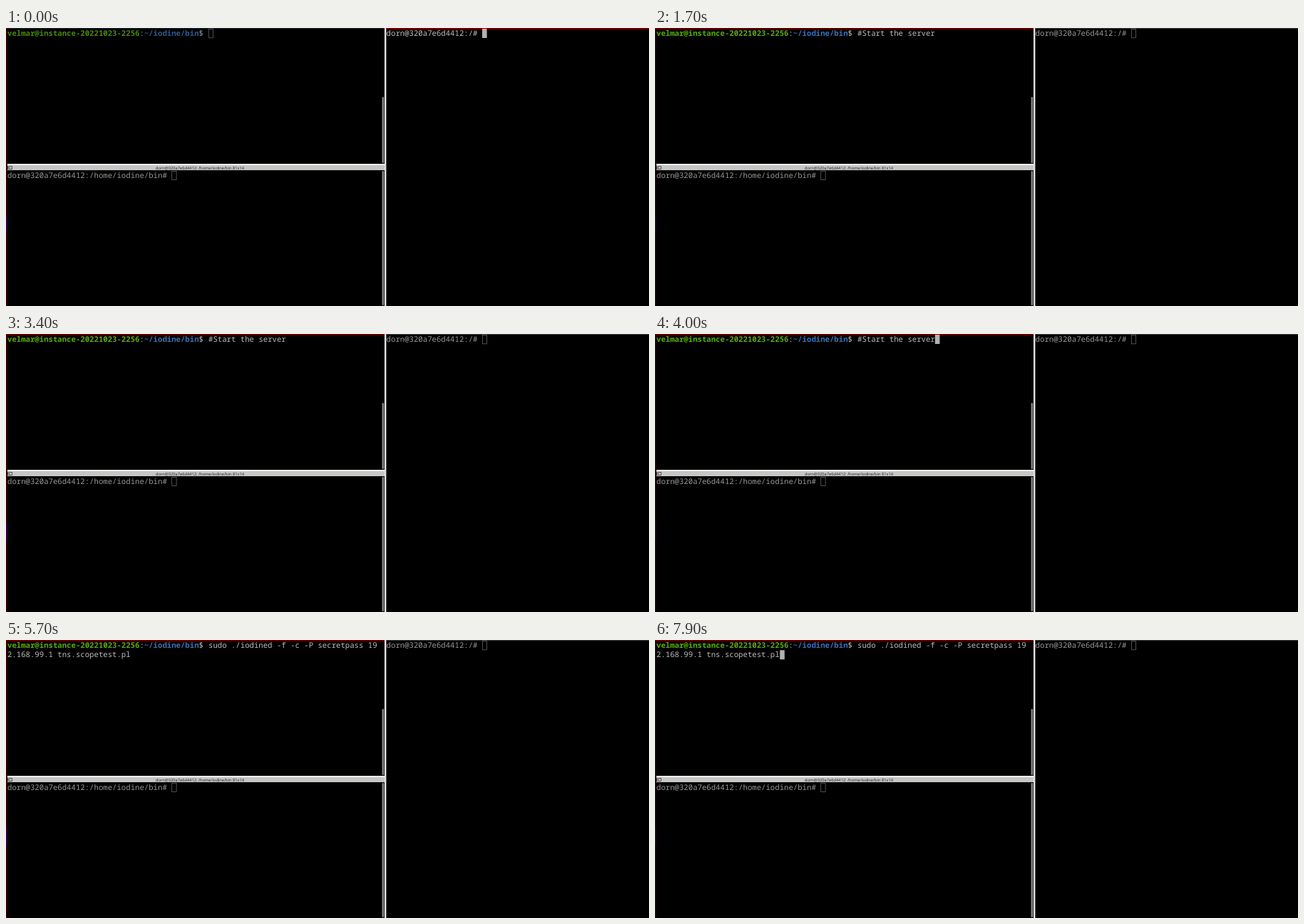
An HTML page that plays this animation: 902x391 px, repeating every 8 s.

```html
<!DOCTYPE html>
<html lang="en">
<head>
<meta charset="utf-8">
<title>Terminal session</title>
<style>
  html, body { margin: 0; width: 100%; height: 100%; overflow: hidden; background: #000; }
  svg { display: block; width: 100%; height: 100%; }
  text {
    font: 10.667px "Noto Sans Mono", "DejaVu Sans Mono", monospace;
    fill: #bdbdbd;
    white-space: pre;
    text-rendering: geometricPrecision;
  }
  .title { font: 5.7px "Open Sans", "Noto Sans", sans-serif; fill: #222; }
  .user { font-weight: bold; fill: #57ad0b; }
  .path { font-weight: bold; fill: #3b72b6; }
  .hollow { fill: none; stroke: #626262; stroke-width: .8; }
  .solid { fill: #b2b2b2; }
  .dim { opacity: .8; }
  .bar { fill: #888; }

  /* Every change is a hard cut; 1% of the loop is 80 ms. */
  .server, .server *, .client, .client *, .typed { animation: 8s step-end infinite; }
  .server .pane { animation-name: server-pane; }
  .client .pane { animation-name: client-pane; }
  .server .idle { animation-name: server-idle; }
  .client .idle { animation-name: client-idle; }
  .server .edge { animation-name: server-edge; }
  .client .edge { animation-name: client-edge; }
  .server .solid { animation-name: server-cursor; }
  .client .solid { animation-name: client-cursor; }
  .server .word1 { animation-name: word1; }
  .server .word2 { animation-name: word2; }
  .server .word3 { animation-name: word3; }
  .server .command { animation-name: command; }

  @keyframes server-pane { 0% { opacity: .8 } 11.25%, 100% { opacity: 1 } }
  @keyframes client-pane { 0% { opacity: 1 } 11.25%, 100% { opacity: .8 } }
  @keyframes server-idle { 0% { opacity: 1 } 11.25%, 100% { opacity: 0 } }
  @keyframes client-idle { 0% { opacity: 0 } 11.25%, 100% { opacity: 1 } }
  @keyframes server-edge { 0% { fill: #24242e } 11.25%, 100% { fill: #850000 } }
  @keyframes client-edge { 0% { fill: #a00000 } 11.25%, 100% { fill: #3c3c40 } }
  @keyframes client-cursor { 0% { opacity: 1 } 6.25%, 100% { opacity: 0 } }

  @keyframes word1 { 0% { opacity: 0 } 21.25% { opacity: 1 } 63.75%, 100% { opacity: 0 } }
  @keyframes word2 { 0% { opacity: 0 } 21.25% { opacity: 1 } 62.5%, 100% { opacity: 0 } }
  @keyframes word3 { 0% { opacity: 0 } 21.25% { opacity: 1 } 61.25%, 100% { opacity: 0 } }
  @keyframes command { 0% { opacity: 0 } 71.25%, 100% { opacity: 1 } }

  @keyframes server-cursor {
    0%     { opacity: 0; transform: translate(0, 0) }
    11.25% { opacity: 1; transform: translate(0, 0) }
    20%    { opacity: 0; transform: translate(108.8px, 0) }
    23.75% { opacity: 1; transform: translate(108.8px, 0) }
    27.5%  { opacity: 0; transform: translate(108.8px, 0) }
    36.25% { opacity: 1; transform: translate(108.8px, 0) }
    42.5%  { opacity: 0; transform: translate(108.8px, 0) }
    48.75% { opacity: 1; transform: translate(108.8px, 0) }
    58.75% { opacity: 0; transform: translate(108.8px, 0) }
    61.25% { opacity: 1; transform: translate(70.4px, 0) }
    62.5%  { opacity: 1; transform: translate(44.8px, 0) }
    63.75% { opacity: 1; transform: translate(0, 0) }
    71.25% { opacity: 0; transform: translate(-108.8px, 13.3px) }
    73.75% { opacity: 1; transform: translate(-108.8px, 13.3px) }
    77.5%  { opacity: 0; transform: translate(-108.8px, 13.3px) }
    85%    { opacity: 1; transform: translate(-108.8px, 13.3px) }
    92.5%  { opacity: 0; transform: translate(-108.8px, 13.3px) }
    98.75%, 100% { opacity: 1; transform: translate(-108.8px, 13.3px) }
  }
</style>
</head>
<body>
<svg viewBox="0 0 902 391" preserveAspectRatio="none">
  <rect width="902" height="391"/>
  <rect width="1.6" height="391" fill="#380006"/>
  <rect y="264" width="1.6" height="24" fill="#2c0048"/>

  <g class="server">
    <rect class="edge" width="531" height="1"/>
    <g class="pane">
      <text x="2" y="11"><tspan class="user">velmar@instance-20221023-2256</tspan>:<tspan class="path">~/iodine/bin</tspan>$</text>
    </g>
    <rect class="hollow idle" x="284.4" y="1.4" width="6" height="12.4"/>
    <text class="word1" x="284" y="11">#Start</text>
    <text class="word2" x="328.8" y="11">the</text>
    <text class="word3" x="354.4" y="11">server</text>
    <g class="command">
      <text x="284" y="11">sudo ./iodined -f -c -P secretpass 19</text>
      <text x="2" y="24.3">2.168.99.1 tns.scopetest.pl</text>
    </g>
    <rect class="solid" x="284" y="1" width="6.6" height="13"/>
    <rect class="bar" x="527.6" y="97" width="2.6" height="93" rx="1.2"/>
  </g>

  <g>
    <text class="dim" x="2" y="211">dorn@320a7e6d4412:/home/iodine/bin#</text>
    <rect class="hollow" x="232.7" y="201.4" width="6.4" height="12.2"/>
    <rect class="bar" x="527.6" y="201" width="2.6" height="189" rx="1.2"/>
  </g>

  <g class="client">
    <rect class="edge" x="534" width="368" height="1"/>
    <g class="pane">
      <text x="533.6" y="11">dorn@320a7e6d4412:/#</text>
    </g>
    <rect class="hollow idle" x="668.4" y="1.4" width="6" height="12.4"/>
    <rect class="solid" x="668" y="1" width="6.6" height="13"/>
  </g>

  <rect x="2" y="191" width="530" height="2" fill="#eee"/>
  <rect x="2" y="193" width="530" height="7" fill="#c6c6c4"/>
  <path d="M2.5 194.5h6v4h-6zM3 196.5h3" fill="none" stroke="#444" stroke-width=".9"/>
  <text class="title" x="272" y="198.6" text-anchor="middle">dorn@320a7e6d4412: /home/iodine/bin 81x14</text>
  <rect x="531" width="2.4" height="391" fill="#e2e2e2"/>
</svg>
</body>
</html>
```
